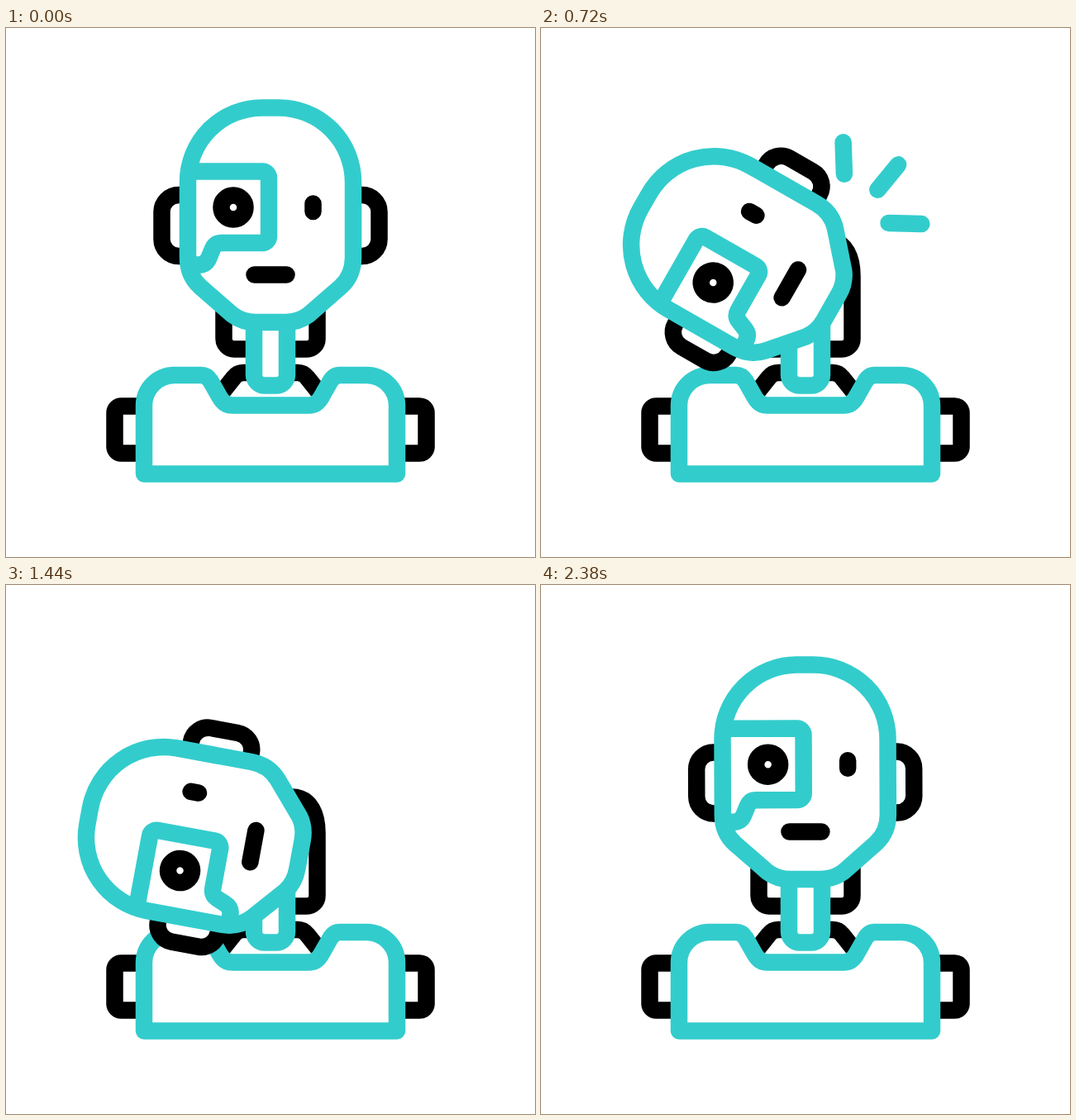
Write an HTML page that moves like this. It is 640x640 px and loops after 2400 ms.

```html
<!DOCTYPE html>
<html lang="en">
<head>
<meta charset="utf-8">
<title>Robot tilting its head</title>
<style>
  html, body { margin: 0; width: 100%; height: 100%; overflow: hidden; background: #fff; }
  svg { display: block; width: 100%; height: 100%; }
  g { stroke-width: 20.5; stroke-linejoin: round; }
  .teal { stroke: #3cc; fill: #fff; }
  .black { stroke: #000; fill: #fff; }
  .round { stroke-linecap: round; }
</style>
</head>
<body>
<svg viewBox="0 0 640 640">
  <defs>
    <g id="burst" class="teal round">
      <path pathLength="1" d="M367.1 183.5L365.4 132"/>
      <path pathLength="1" d="M402.9 201L436.1 160.5"/>
      <path pathLength="1" d="M413.5 235.8L466.8 237.2"/>
    </g>
  </defs>

  <g class="black">
    <path d="M295 256.5H345C370 256.5 376.5 280 376.5 300V376a12.5 12.5 0 0 1-12.5 12.5H276a12.5 12.5 0 0 1-12.5-12.5V300C263.5 280 270 256.5 295 256.5Z"/>
    <path d="M258 445L275.5 423Q280 417 287 417H353Q360 417 364.5 423L382 445"/>
    <path d="M167 457.5H139.5a8 8 0 0 0-8 8V506.5a8 8 0 0 0 8 8H167"/>
    <path d="M473 457.5H500.5a8 8 0 0 1 8 8V506.5a8 8 0 0 1-8 8H473"/>
  </g>
  <g class="teal">
    <path d="M167 539.5V457A37 37 0 0 1 204 420H236Q243.5 420 248 428L258.5 446.5Q264 456.5 274 456.5H366Q376 456.5 381.5 446.5L392 428Q396.5 420 404 420H436A37 37 0 0 1 473 457V539.5Z"/>
    <path d="M300 330V419.5a13 13 0 0 0 13 13H327a13 13 0 0 0 13-13V330"/>
  </g>

  <g id="head">
    <g class="black">
      <path d="M220 202H209a20.5 20.5 0 0 0-20.5 20.5V255.5a20.5 20.5 0 0 0 20.5 20.5H220"/>
      <path d="M420 202H431a20.5 20.5 0 0 1 20.5 20.5V255.5a20.5 20.5 0 0 1-20.5 20.5H420"/>
    </g>
    <g class="teal">
      <path d="M310 96.5H330A90 90 0 0 1 420 186.5V278C420 293 415 304 405 313L366 347C358 353 349 356 338 356H302C291 356 282 353 274 347L235 313C225 304 220 293 220 278V186.5A90 90 0 0 1 310 96.5Z"/>
      <path fill="none" style="fill:none" d="M220 173.5H310a8 8 0 0 1 8 8V252a8 8 0 0 1-8 8H261Q253 260 250 267L245.5 278Q242 286.5 233 286.5H226"/>
    </g>
    <g class="black round">
      <circle cx="275" cy="217" r="14.5"/>
      <path d="M371.5 212.5V222M300.5 298.5H339.5"/>
    </g>
  </g>

  <use id="burstRight" href="#burst"/>
  <use id="burstLeft" href="#burst" transform="rotate(180 274 285.5)"/>
</svg>
<script>
  const LOOP = 2400;
  // [time in ms, head tilt in degrees]
  const TILTS = [[0, 0], [480, 60.3], [820, 60.3], [1100, 90], [1365, 90], [1657, 27.8], [2020, 27.8], [LOOP, 0]];
  const BURST_START = 580, BURST_LENGTH = 280, BURST_GAP = 1200;

  const byId = id => document.getElementById(id);
  const head = byId('head'), burst = byId('burst');
  const right = byId('burstRight'), left = byId('burstLeft');

  function ease(t, from, to) {
    const u = Math.min(1, Math.max(0, (t - from) / (to - from)));
    return u * u * (3 - 2 * u);
  }

  function tiltAt(t) {
    const i = TILTS.findIndex(([time]) => time > t);
    const [t0, a] = TILTS[i - 1], [t1, b] = TILTS[i];
    return a + (b - a) * ease(t, t0, t1);
  }

  function draw(t) {
    head.setAttribute('transform', `rotate(${-tiltAt(t)} 320 320)`);

    const second = t >= BURST_START + BURST_GAP;
    const local = t - BURST_START - (second ? BURST_GAP : 0);
    const visible = local > 0 && local < BURST_LENGTH;
    const tip = ease(local, 0, 180), tail = ease(local, 100, BURST_LENGTH);
    right.style.display = visible && !second ? '' : 'none';
    left.style.display = visible && second ? '' : 'none';
    burst.style.strokeDasharray = `${Math.max(0, tip - tail)} 3`;
    burst.style.strokeDashoffset = -tail;
  }

  function frame() {
    draw(performance.now() % LOOP);
    requestAnimationFrame(frame);
  }
  frame();
</script>
</body>
</html>
```
